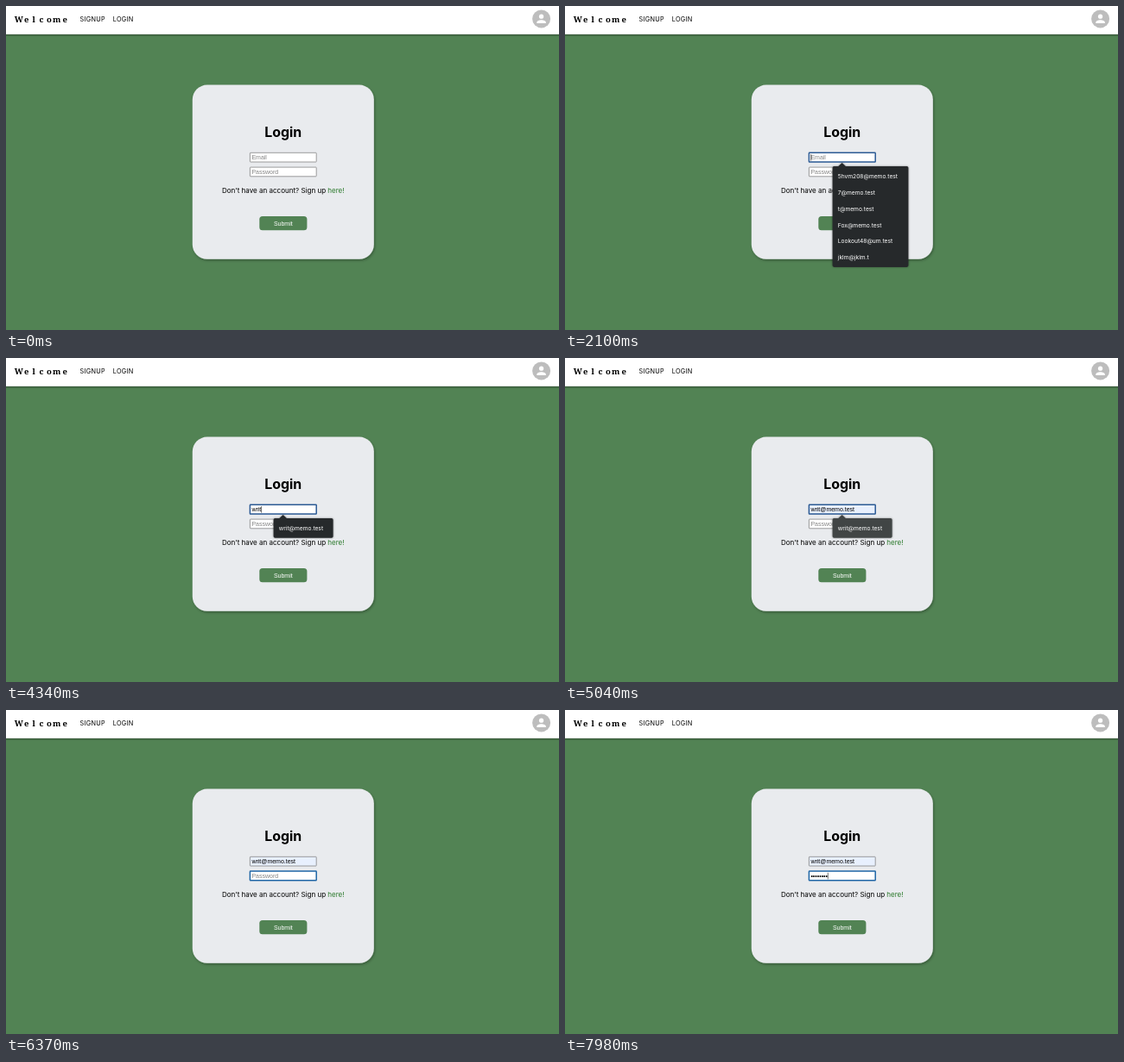
Write an HTML page that moves like this. It is 640x376 px and loops after 8 s.

```html
<!DOCTYPE html>
<html lang="en">
<head>
<meta charset="utf-8">
<title>Login</title>
<style>
  html, body { margin: 0; width: 100%; height: 100%; overflow: hidden; background: #528354; }
  svg { display: block; width: 100vw; height: 100vh; }
  text { font-family: Inter, Roboto, sans-serif; white-space: pre; }
  .brand { font: 600 9.5px "Noto Serif", serif; text-anchor: middle; }
  .nav { font-size: 7.3px; letter-spacing: .28px; }
  .title { font-size: 15.9px; font-weight: 700; text-anchor: middle; }
  .note { font-size: 8.02px; }
  .field text, .submit { font: 7px "Liberation Sans", Arial, sans-serif; }
  .submit { fill: #fff; text-anchor: middle; }
  .box { fill: #fff; stroke: #858585; stroke-width: .8; }
  .pressed .box { stroke: #555; stroke-width: 1; }
  .filled .box { fill: #e8f0fe; }
  .focus .box { stroke: #2b5a94; stroke-width: 1.5; }
  #password.focus .box { stroke: #1f66a6; }
  .empty text { fill: #858585; }
  .caret { stroke: #111; stroke-width: .6; visibility: hidden; }
  #popup { fill: #26292b; filter: drop-shadow(0 .8px 1.2px rgba(0,0,0,.45)); }
  #popup.hover { fill: #414545; }
  #popup text { fill: #fff; font-size: 6.65px; }
</style>
</head>
<body>
<svg viewBox="0 0 640 376">
  <defs>
    <filter id="barShadow" x="-5%" y="-20%" width="110%" height="160%">
      <feDropShadow dx="0" dy="1" stdDeviation="1.2" flood-opacity=".5"/>
    </filter>
    <filter id="cardShadow">
      <feDropShadow dx="1" dy="1.6" stdDeviation="1.4" flood-opacity=".32"/>
    </filter>
  </defs>
  <rect width="640" height="376" fill="#528354"/>

  <rect x="-5" y="-5" width="650" height="37.8" fill="#fff" filter="url(#barShadow)"/>
  <text class="brand" x="14.8 23.6 32.3 41 49.8 58.6 68.1" y="18.7">Welcome</text>
  <text class="nav" x="85.6" y="17.5">SIGNUP</text>
  <text class="nav" x="123.8" y="17.5">LOGIN</text>
  <circle cx="619.6" cy="14.9" r="10.5" fill="#bdbdbd"/>
  <g fill="#fff" transform="translate(611.7 7) scale(.656)">
    <circle cx="12" cy="8" r="4"/>
    <path d="M12 14c-2.67 0-8 1.34-8 4v2h16v-2c0-2.66-5.33-4-8-4z"/>
  </g>

  <rect x="215.8" y="91.6" width="210" height="202.2" rx="17" fill="#e9ebee" filter="url(#cardShadow)"/>
  <text class="title" x="320.8" y="152.4">Login</text>
  <g class="field" id="email">
    <rect class="box" x="282.4" y="170.3" width="76.8" height="10.7" rx=".6"/>
    <text x="284.4" y="178"></text>
    <path class="caret" d="M0 172v7.6"/>
  </g>
  <g class="field" id="password">
    <rect class="box" x="282.4" y="187.1" width="76.8" height="10.7" rx=".6"/>
    <text x="284.4" y="194.8"></text>
    <path class="caret" d="M0 188.8v7.6"/>
  </g>
  <text class="note" x="250" y="216.9">Don't have an account? Sign up <tspan fill="#2c7a2c">here!</tspan></text>
  <rect x="293.3" y="243.9" width="55.1" height="16.4" rx="3.6" fill="#528354"/>
  <text class="submit" x="320.8" y="254.5">Submit</text>

  <g id="popup"></g>
</svg>
<script>
const LOOP = 8000, BLINK = 490;
const ADDRESS = "writ@memo.test";
const ALL = ["5hvm208@memo.test", "7@memo.test", "t@memo.test", "Fox@memo.test", "Lookout48@um.test", "jklm@jklm.t"];
const MATCHES = [ADDRESS, "w@memo.test", "winter@memo.test"];

const PRESS = 1960, OPEN = 2100, PICK = 4900, CLOSE = 5250, NEXT = 5670;
const emailKeys = [3570, 3780, 3990, 4340];
const passwordKeys = [6510, 6790, 7000, 7140, 7350, 7560, 7700, 7910];

const popup = document.getElementById("popup");
const email = document.getElementById("email");
const password = document.getElementById("password");
let popupKey = "";

const countPassed = (keys, t) => keys.filter(k => k <= t).length;

// The caret restarts its blink on focus and on every key.
function caretOn(t, start, keys) {
  const last = Math.max(start, ...keys.filter(k => k <= t));
  return Math.floor((t - last) / BLINK) % 2 === 0;
}

function drawField(field, value, hint, classes, caret) {
  const text = field.querySelector("text");
  const mark = field.querySelector(".caret");
  text.textContent = value || hint;
  field.setAttribute("class", "field " + classes + (value ? "" : " empty"));
  mark.style.visibility = caret ? "visible" : "hidden";
  const x = 284.7 + (value ? text.getComputedTextLength() : 0);
  mark.setAttribute("transform", `translate(${x} 0)`);
}

function drawPopup(items, width, hover) {
  const key = items.join() + hover;
  if (key === popupKey) return;
  popupKey = key;
  popup.setAttribute("class", hover ? "hover" : "");
  if (!items.length) { popup.innerHTML = ""; return; }
  const step = 18.83;
  popup.innerHTML =
    `<path d="M315.8 186.5l4.8-4.6 4.8 4.6z"/>` +
    `<rect x="309.6" y="186" width="${width}" height="${3.9 + step * items.length}" rx="1.8"/>` +
    items.map((item, i) => `<text x="315.8" y="${200.1 + step * i}">${item}</text>`).join("");
}

function suggestions(t, typed) {
  if (t < OPEN || t >= CLOSE) return [[], 0];
  if (typed === 0) return [ALL, 87.8];
  if (typed === 1) return [MATCHES, 81.6];
  if (typed === 2) return [[MATCHES[0], MATCHES[2]].filter(m => m.startsWith("w")), 81.6];
  if (typed === 3) return [[MATCHES[0], MATCHES[2]], 81.6];
  return [[ADDRESS], 69];
}

function render(t) {
  const typed = countPassed(emailKeys, t);
  const picked = t >= PICK;
  const emailFocus = t >= OPEN && t < NEXT;
  const emailClass = [
    t >= PRESS && t < OPEN && "pressed",
    emailFocus && "focus",
    picked && "filled"
  ].filter(Boolean).join(" ");
  drawField(email, picked ? ADDRESS : ADDRESS.slice(0, typed), "Email", emailClass,
    emailFocus && !picked && caretOn(t, OPEN, emailKeys));

  const passwordFocus = t >= NEXT;
  drawField(password, "•".repeat(countPassed(passwordKeys, t)), "Password",
    passwordFocus ? "focus" : "", passwordFocus && caretOn(t, NEXT, passwordKeys));

  const [items, width] = suggestions(t, typed);
  drawPopup(items, width, picked && t < CLOSE);
}

const start = performance.now();
function tick() {
  render((performance.now() - start) % LOOP);
  requestAnimationFrame(tick);
}
tick();
</script>
</body>
</html>
```
